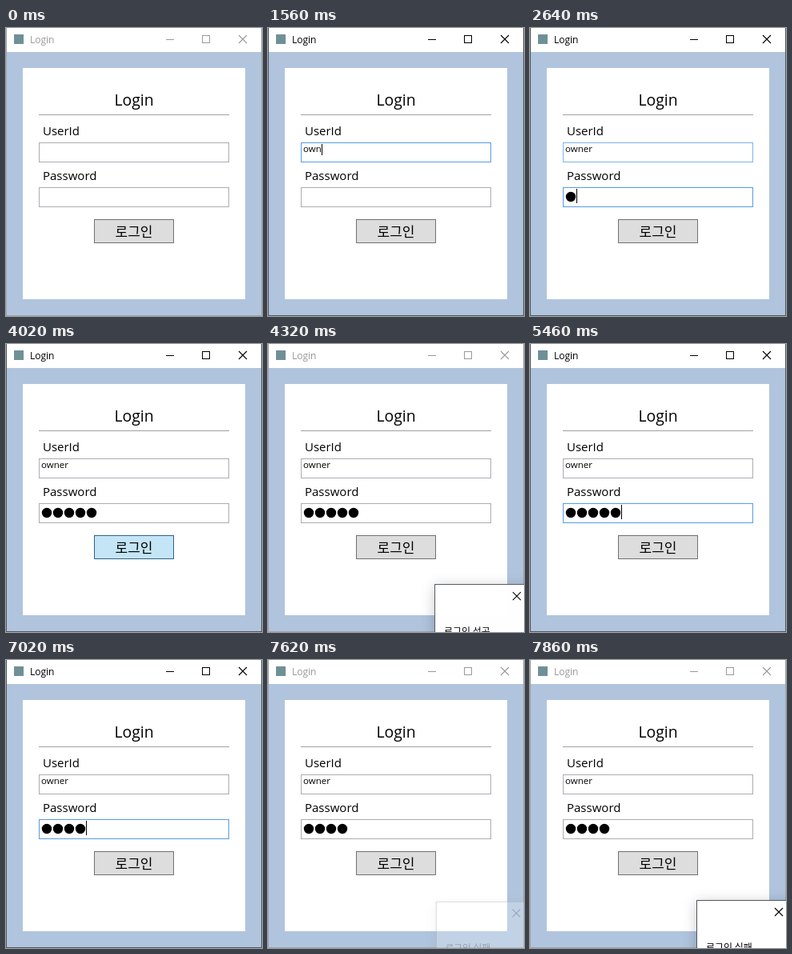
Animation, 320 px wide and 360 px high, one loop 8 s. Source, as an HTML page with a canvas:

```html
<!DOCTYPE html>
<html lang="ko">
<head>
<meta charset="utf-8">
<style>
  html, body { margin: 0; width: 100%; height: 100%; overflow: hidden; background: #fff; }
  canvas { display: block; }
</style>
</head>
<body>
<canvas id="stage" width="320" height="360"></canvas>
<script>
const ctx = document.getElementById('stage').getContext('2d');
const LOOP = 8000, TICK = 60;
const LATIN = '"Open Sans", "Noto Sans", sans-serif';
const KOREAN = '"Noto Sans CJK KR", "Noto Sans CJK", sans-serif';
const USER = 'owner';
const BORDER = { idle: '#abadb3', hover: '#7eb4ea', focus: '#569de5' };
const BUTTON = {
  idle: ['#dddddd', '#707070'],
  hover: ['#bee6fd', '#3c7fb1'],
  press: ['#c4e5f6', '#2c628b']
};

// Each track lists [start time, value] pairs.
const tracks = {
  active: [[0, false], [480, true], [4140, false], [4980, true], [7620, false]],
  userBox: [[0, 'idle'], [120, 'hover'], [480, 'focus'], [2340, 'hover'], [3660, 'idle']],
  passBox: [[0, 'idle'], [2340, 'hover'], [2400, 'focus'], [3960, 'idle'],
            [5280, 'hover'], [5460, 'focus'], [7440, 'idle']],
  letters: [[0, 0], [1200, 1], [1380, 2], [1560, 3], [1740, 4], [1860, 5]],
  dots: [[0, 0], [2640, 1], [2820, 2], [2940, 3], [3120, 4], [3240, 5], [6060, 4]],
  caret: [[0, ''], [480, 'user'], [1020, ''], [1200, 'user'], [2340, 'pass'], [3780, ''],
          [5460, 'pass'], [6540, ''], [7020, 'pass'], [7440, '']],
  button: [[0, 'idle'], [3660, 'hover'], [3960, 'press'], [4080, 'idle'],
           [7320, 'hover'], [7440, 'press'], [7560, 'idle']]
};

function valueAt(track, t) {
  let value = track[0][1];
  for (const [start, next] of track) if (t >= start) value = next;
  return value;
}

function dialogAlpha(t) {
  const fadeIn = start => 1 - Math.pow(1 - Math.min(1, (t - start) / 240 + 0.12), 2);
  if (t >= 7620) return fadeIn(7620);
  if (t < 4140 || t >= 5100) return 0;
  if (t >= 4980) return t < 5040 ? 0.65 : 0.3;
  return fadeIn(4140);
}

function box(x, y, w, h, fill, edge) {
  ctx.fillStyle = fill;
  ctx.fillRect(x, y, w, h);
  ctx.strokeStyle = edge;
  ctx.lineWidth = 1;
  ctx.strokeRect(x + 0.5, y + 0.5, w - 1, h - 1);
}

function label(text, x, y, size, color = '#000', family = LATIN, align = 'left') {
  ctx.font = `${size}px ${family}`;
  ctx.textAlign = align;
  ctx.fillStyle = color;
  ctx.fillText(text, x, y);
}

function cross(x, y, color) {
  ctx.strokeStyle = color;
  ctx.lineWidth = 1.1;
  ctx.beginPath();
  ctx.moveTo(x - 5, y - 5);
  ctx.lineTo(x + 5, y + 5);
  ctx.moveTo(x + 5, y - 5);
  ctx.lineTo(x - 5, y + 5);
  ctx.stroke();
}

function drawWindow(active) {
  const ink = active ? '#000' : '#999';
  box(0, -1, 320, 361, '#b0c4de', active ? '#505860' : '#a0a4aa');
  ctx.fillStyle = '#fff';
  ctx.fillRect(1, 0, 318, 30);
  ctx.fillRect(21, 50, 278, 289);
  ctx.fillStyle = '#6f9096';
  ctx.fillRect(10, 8, 12, 12);
  label('Login', 30, 19, 12, ink);
  ctx.fillStyle = ink;
  ctx.fillRect(200, 14, 10, 1);
  box(245, 9, 10, 10, '#fff', ink);
  cross(296, 14, ink);
}

function drawForm(s) {
  label('Login', 160, 97, 19.4, '#000', LATIN, 'center');
  ctx.fillStyle = '#a0a0a0';
  ctx.fillRect(41, 108, 238, 1);
  label('UserId', 46, 134, 15);
  label('Password', 46, 190, 15);
  box(41, 143, 238, 25, '#fff', BORDER[s.userBox]);
  box(41, 199, 238, 25, '#fff', BORDER[s.passBox]);

  const typed = USER.slice(0, s.letters);
  label(typed, 44, 155, 11.5);
  const typedWidth = ctx.measureText(typed).width;
  ctx.beginPath();
  for (let i = 0; i < s.dots; i++) {
    ctx.moveTo(57 + 14 * i, 211);
    ctx.arc(51 + 14 * i, 211, 6.2, 0, Math.PI * 2);
  }
  ctx.fill();
  if (s.caret === 'user') ctx.fillRect(44 + Math.round(typedWidth), 145, 1, 14);
  if (s.caret === 'pass') ctx.fillRect(44 + 14 * s.dots, 201, 1, 18);

  box(110, 239, 100, 30, ...BUTTON[s.button]);
  label('로그인', 160, 261, 17, '#000', KOREAN, 'center');
}

// The shadow is clipped to the outside so the box stays white while it fades.
function drawShadow(x, y, w, h) {
  ctx.save();
  ctx.beginPath();
  ctx.rect(0, 0, 400, 500);
  ctx.rect(x, y, w, h);
  ctx.clip('evenodd');
  ctx.shadowColor = 'rgba(0, 0, 0, .22)';
  ctx.shadowBlur = 16;
  ctx.shadowOffsetY = 3;
  ctx.fillStyle = '#fff';
  ctx.fillRect(x, y, w, h);
  ctx.restore();
}

function drawDialog(alpha, message, closing) {
  if (!alpha) return;
  const scale = 0.97 + 0.03 * alpha;
  ctx.save();
  ctx.globalAlpha = alpha;
  ctx.translate(284, 375);
  ctx.scale(scale, scale);
  ctx.translate(-284, -375);
  drawShadow(208, 300, 152, 150);
  box(208, 300, 152, 150, '#fff', closing ? '#a0a4aa' : '#505860');
  if (!closing) cross(311, 315, '#000');
  label(message, 220, 364, 12, '#000', KOREAN);
  ctx.restore();
}

function render(time) {
  const t = Math.floor((time % LOOP) / TICK) * TICK;
  const state = {};
  for (const name in tracks) state[name] = valueAt(tracks[name], t);
  drawWindow(state.active);
  drawForm(state);
  drawDialog(dialogAlpha(t), t < 6000 ? '로그인 성공' : '로그인 실패', state.active);
}

const begin = performance.now();
function loop() {
  render(performance.now() - begin);
  requestAnimationFrame(loop);
}
loop();
</script>
</body>
</html>
```
